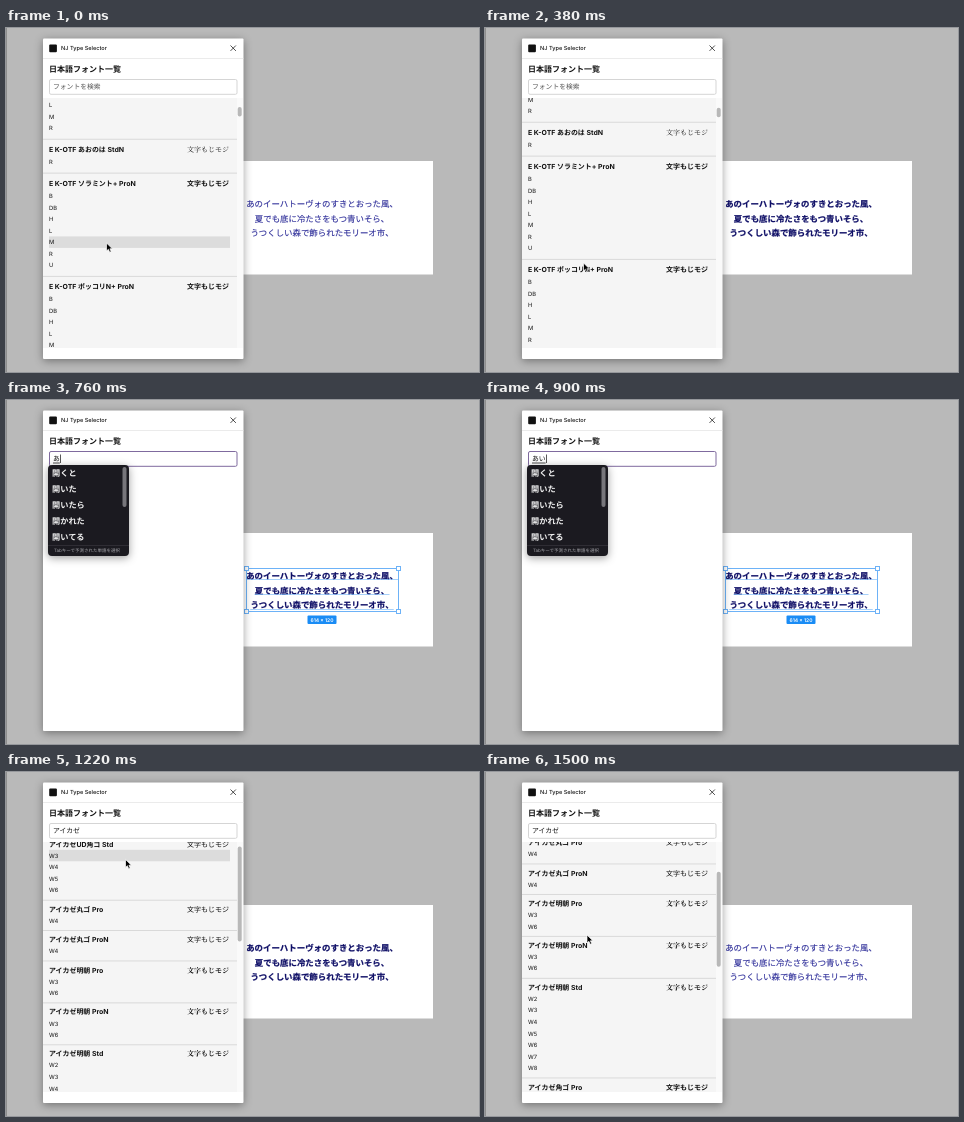
Write an HTML page that moves like this. It is 473x344 px and loops after 1.52 s.

```html
<!DOCTYPE html>
<html lang="ja">
<head>
<meta charset="utf-8">
<style>
html, body { margin: 0; width: 100%; height: 100%; overflow: hidden; background: #b9b9b9; }
svg { display: block; width: 473px; height: 344px; }
text { font-family: Inter, "Noto Sans CJK JP", "Noto Sans CJK", sans-serif; fill: #111; text-rendering: geometricPrecision; white-space: pre; }
.panel { filter: drop-shadow(0 2px 4px rgba(0, 0, 0, .38)); }
.serif { font-family: "Noto Serif CJK JP", "Noto Serif CJK", "Noto Serif", serif; }
.poem text { text-anchor: middle; fill: inherit; }
.blue { stroke: #6db2f7; fill: none; }
</style>
</head>
<body>
<svg viewBox="0 0 473 344">
  <defs><clipPath id="view"><rect x="37" y="70" width="200" height="250"/></clipPath></defs>
  <rect width="473" height="344" fill="#b9b9b9"/>
  <rect width="1" height="344" fill="#8e8e8e"/>
  <rect x="205" y="133" width="222" height="113.5" fill="#fff"/>
  <g class="poem" id="poem"></g>
  <g id="selection"></g>

  <rect class="panel" x="37" y="10.5" width="200.5" height="320.5" rx="1" fill="#fff"/>
  <rect x="37" y="30" width="200.5" height=".7" fill="#e2e2e2"/>
  <rect x="43.2" y="16.6" width="7.7" height="7.7" rx="1" fill="#111"/>
  <path d="M224.5 17.5l5.4 5.4m0-5.4l-5.4 5.4" stroke="#222" stroke-width=".8"/>
  <g id="titles"></g>

  <g clip-path="url(#view)">
    <g id="listBox">
      <rect x="37" y="70" width="194" height="250" fill="#f5f5f5"/>
      <rect x="231" y="70" width="6.5" height="250" fill="#fafafa"/>
      <rect id="hover" x="43" width="181" height="11.5" fill="#dcdcdc"/>
      <g id="allFonts"></g>
      <g id="results"></g>
      <rect id="thumb" x="231.7" width="4" rx="2" fill="#b8b8b8"/>
    </g>
  </g>

  <rect id="field" x="43.5" y="51.5" width="187.5" height="14.8" rx="1.5" fill="#fff"/>
  <rect id="mark" x="46.5" y="54" width="28" height="9.5" fill="#dcdce8"/>
  <text id="query" x="47" y="58.7" dy=".37em" font-size="6.8"></text>
  <rect id="underline" x="47" y="62.6" height=".8" fill="#222"/>
  <rect id="caret" y="54.5" width=".7" height="8.5" fill="#111"/>
  <g id="popup">
    <rect class="panel" x="42" y="65" width="81" height="91" rx="4" fill="#1b1a20"/>
    <rect x="116.5" y="67" width="4" height="40" rx="2" fill="#77767b"/>
    <rect x="42" y="145" width="81" height=".6" fill="#3c3b41"/>
  </g>
  <path id="cursor" d="M0 0v8l1.9-1.7 1.3 3 1.5-.7-1.3-2.8h2.5z" fill="#000" stroke="#fff" stroke-width=".7"/>
</svg>
<script>
const DURATION = 1520, STEP = 20;
const $ = id => document.getElementById(id);

function add(parent, tag, attrs, content = '') {
  const node = document.createElementNS('http://www.w3.org/2000/svg', tag);
  for (const key in attrs) node.setAttribute(key, attrs[key]);
  node.textContent = content;
  parent.append(node);
  return node;
}
const label = (parent, x, y, content, size, attrs) =>
  add(parent, 'text', { x, y, dy: '.37em', 'font-size': size, ...attrs }, content);
const show = (id, visible) => $(id).setAttribute('visibility', visible ? 'inherit' : 'hidden');
const set = (id, attrs) => { for (const key in attrs) $(id).setAttribute(key, attrs[key]); };

// Each group: [name, weights, sample font weight, serif?]
function buildList(parent, top, gaps, groups) {
  let y = top;
  for (const [name, weights, bold, serif] of groups) {
    label(parent, 43, y, name, 6.95, { 'font-weight': 700 });
    label(parent, 181, y, '文字もじモジ', 7, { 'font-weight': bold, class: serif ? 'serif' : '' });
    y += gaps.first;
    weights.split(' ').forEach((weight, i) => {
      if (i) y += 11.55;
      label(parent, 43, y, weight, 5.8, { fill: '#333' });
    });
    y += gaps.after;
    add(parent, 'rect', { x: 37, y, width: 194, height: .8, fill: '#d2d2d2' });
    y += gaps.before;
  }
}

label($('titles'), 55, 20.3, 'NJ Type Selector', 5.6, { 'font-weight': 500 });
label($('titles'), 43, 41, '日本語フォント一覧', 8, { 'font-weight': 700 });

const ALL = 'B DB H L M R U';
buildList($('allFonts'), 64.2, { first: 12.8, after: 10.7, before: 10.4 }, [
  ['', 'L M R', 400],
  ['E K-OTF あおのは StdN', 'R', 400, true],
  ['E K-OTF ソラミント+ ProN', ALL, 700],
  ['E K-OTF ポッコリN+ ProN', ALL, 900],
  ['E K-OTF 月白かすみ明朝 StdN', 'L', 400, true]
]);
buildList($('results'), 78.5, { first: 11.5, after: 9.5, before: 9.4 }, [
  ['アイカゼUD角ゴ Std', 'W3 W4 W5 W6', 500],
  ['アイカゼ丸ゴ Pro', 'W4', 500],
  ['アイカゼ丸ゴ ProN', 'W4', 500],
  ['アイカゼ明朝 Pro', 'W3 W6', 600, true],
  ['アイカゼ明朝 ProN', 'W3 W6', 600, true],
  ['アイカゼ明朝 Std', 'W2 W3 W4 W5 W6 W7 W8', 600, true],
  ['アイカゼ角ゴ Pro', 'W3 W6', 600]
]);

['あのイーハトーヴォのすきとおった風、', '夏でも底に冷たさをもつ青いそら、', 'うつくしい森で飾られたモリーオ市、']
  .forEach((line, i) => {
    label($('poem'), 316, 175.6 + i * 14.8, line, 8.44);
    const half = line.length * 4.22;
    add($('selection'), 'path', { class: 'blue', 'stroke-width': .6, d: `M${316 - half} ${179.5 + i * 15}h${half * 2}` });
  });

add($('selection'), 'rect', { class: 'blue', x: 240.5, y: 168.5, width: 152, height: 43 });
for (const x of [240.5, 392.5]) for (const y of [168.5, 211.5])
  add($('selection'), 'rect', { class: 'blue', x: x - 2, y: y - 2, width: 4, height: 4, style: 'fill:#fff' });
add($('selection'), 'rect', { x: 301.5, y: 215.5, width: 29, height: 8.5, rx: 1, fill: '#1a8cf5' });
label($('selection'), 316, 219.7, '614 × 120', 5, { 'text-anchor': 'middle', 'font-weight': 600, style: 'fill:#fff' });

['開くと', '開いた', '開いたら', '開かれた', '開いてる'].forEach((word, i) =>
  label($('popup'), 46, 73 + i * 16, word, 8.2, { 'font-weight': 700, style: 'fill:#f2f2f2' }));
label($('popup'), 48, 150.5, 'Tabキーで予測された単語を選択', 4.5, { style: 'fill:#a5a5aa' });

// Linear interpolation through [time, value] points
function tween(t, points) {
  const i = points.findIndex(p => p[0] > t);
  if (i < 0) return points.at(-1)[1];
  if (!i) return points[0][1];
  const [t0, a] = points[i - 1], [t1, b] = points[i];
  return a + (b - a) * (t - t0) / (t1 - t0);
}
// Latest value whose time has passed
const latest = (t, points) => points.filter(p => p[0] <= t).at(-1)[1];

const cursorX = [[100, 100.5], [240, 98.5], [540, 98.5], [600, 120.5], [660, 120], [1160, 118], [1260, 120.5], [1360, 120.5], [1480, 102]];
const cursorY = [[100, 215], [240, 235], [540, 235], [600, 91], [660, 59], [1160, 64], [1260, 103], [1360, 103], [1480, 163]];
const scrollAll = [[320, 0], [380, 17], [540, 56]];
const scrollResults = [[1180, 0], [1260, 12.8], [1360, 12.8], [1500, 73]];
const typed = [[0, ''], [760, 'あ'], [840, 'あい'], [940, 'あいか'], [1000, 'あいかぜ'], [1040, 'アイカゼ']];
const poemStyle = [[0, [400, .1, '#2c2c98']], [100, [500, .15, '#202082']], [280, [900, .2, '#0e0e66']], [1300, [400, .1, '#2c2c98']]];

function render(t) {
  const query = latest(t, typed), filtered = t >= 1040;
  const composing = query && t < 1100, focused = t >= 680 && t < 1140;

  const [weight, stroke, color] = latest(t, poemStyle);
  set('poem', { 'font-weight': weight, 'stroke-width': stroke, stroke: color, fill: color });
  show('selection', focused);

  const scroll = tween(t, filtered ? scrollResults : scrollAll);
  show('listBox', !query || filtered);
  show('allFonts', !filtered);
  show('results', filtered);
  set(filtered ? 'results' : 'allFonts', { transform: `translate(0 ${-scroll})` });
  set('thumb', filtered ? { y: 72 + scroll * .38, height: 95 } : { y: 79 + scroll * .05, height: 9.5 });

  const x = tween(t, cursorX), y = tween(t, cursorY);
  show('cursor', t < 720 || t >= 1140);
  set('cursor', { transform: `translate(${x} ${y})` });

  // Rows sit on an 11.55 px pitch below each group name
  const [firstRow, rows] = filtered ? [84.2, 4] : [162.2, 7];
  const row = Math.floor((y + scroll - firstRow) / 11.55);
  show('hover', (!query || filtered && !focused) && y > 70 && row >= 0 && row < rows);
  set('hover', { y: firstRow + row * 11.55 - scroll });

  const end = 47 + query.length * 6.8;
  $('query').textContent = query || (focused ? '' : 'フォントを検索');
  $('query').style.fill = query ? '#111' : '#555';
  set('query', { 'font-weight': composing && filtered ? 700 : 400 });
  set('field', { stroke: focused ? '#7f6a9e' : '#d5d5d5' });
  show('mark', composing && filtered);
  show('underline', composing);
  set('underline', { width: end - 47 });
  show('caret', focused && !filtered);
  set('caret', { x: end + .4 });
  show('popup', composing && !filtered);
}

function tick() {
  render(Math.floor(performance.now() % DURATION / STEP) * STEP);
  requestAnimationFrame(tick);
}
tick();
</script>
</body>
</html>
```
